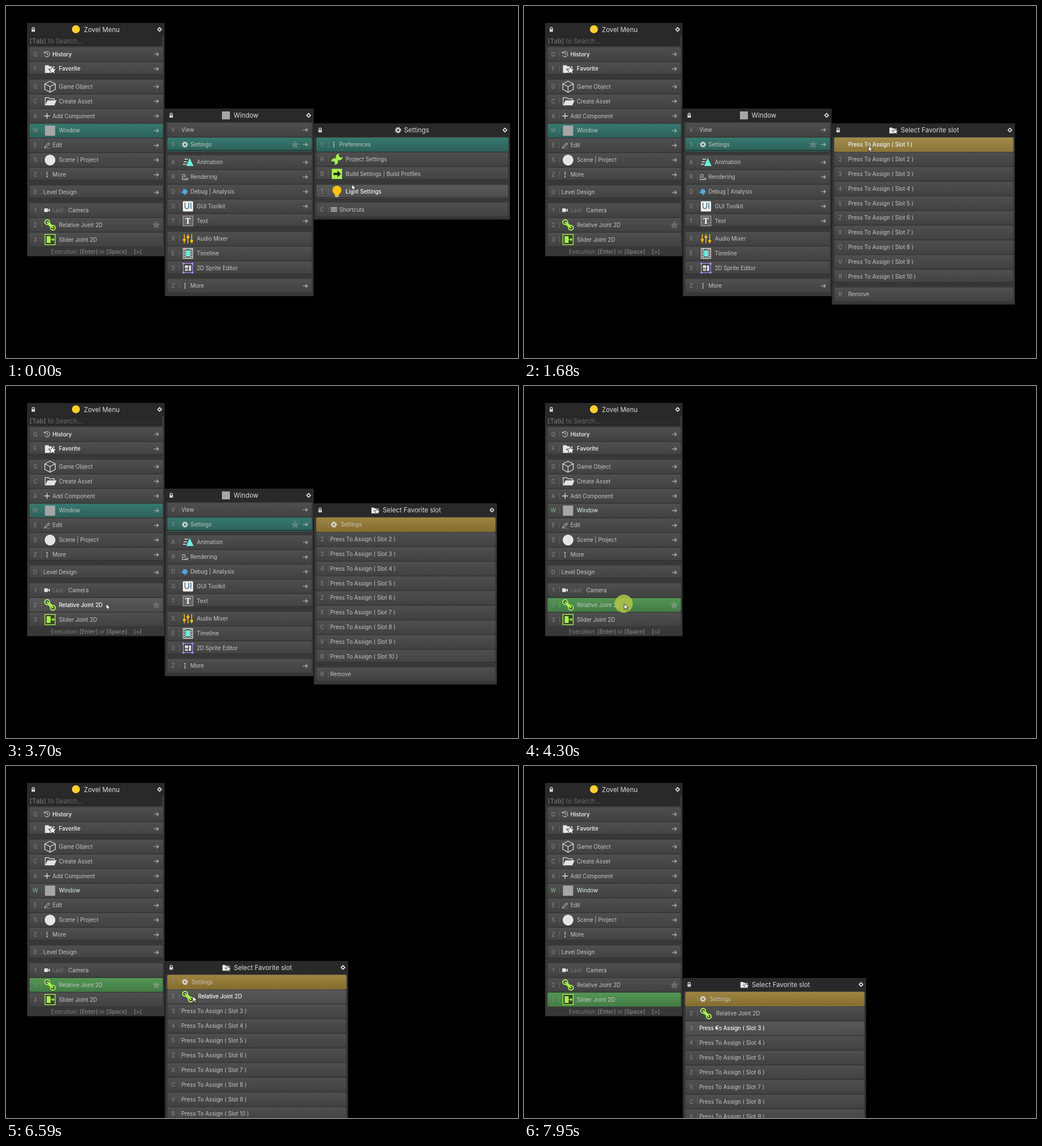
These frames come from a looping animation (901 by 621 pixels, 8000 ms). An HTML page:

```html
<!DOCTYPE html>
<html lang="en">
<head>
<meta charset="utf-8">
<title>Menu with favorite slots</title>
<style>
html, body { margin: 0; width: 100%; height: 100%; overflow: hidden; background: #000; }
svg { display: block; width: 100vw; height: 100vh; font: 9.72px Inter, sans-serif; }
text { fill: #c6c6c6; white-space: pre; }
.title { font-size: 11.4px; fill: #dcdcdc; }
.key { fill: #818181; text-anchor: middle; font-weight: 500; }
.strong { font-weight: 600; fill: #e6e6e6; }
.dim { fill: #7b7b7b; }
.lit text:not(.dim) { fill: #f0f0f0; }
.line { fill: none; stroke: #dedede; stroke-width: 1.3; stroke-linejoin: round; stroke-linecap: round; }
.thin { stroke-width: 1; }
.thick { stroke-width: 1.7; }
.solid { fill: #e4e4e4; }
.lime { fill: #a8f04e; }
.limeline { fill: none; stroke: #a8f04e; }
.timed { animation: 8s step-end infinite; }
#cursor { animation: move 8s linear infinite; }
@keyframes move {
  0%, .75% { transform: translate(608.5px, 314.5px); animation-timing-function: ease-in-out; }
  7%, 11.625% { transform: translate(440px, 247px); animation-timing-function: ease-in; }
  15% { transform: translate(500px, 257px); animation-timing-function: ease-out; }
  19.8%, 23.5% { transform: translate(606.3px, 246.5px); animation-timing-function: ease-in; }
  32.25% { transform: translate(393px, 300px); }
  37.5% { transform: translate(228.6px, 363.7px); animation-timing-function: ease-out; }
  42.75% { transform: translate(191px, 373px); animation-timing-function: ease-out; }
  46.25%, 59.75% { transform: translate(176.3px, 384px); animation-timing-function: ease-in-out; }
  67.5%, 82.375% { transform: translate(328.8px, 406px); animation-timing-function: ease-in-out; }
  87%, 92.625% { transform: translate(207.3px, 406px); animation-timing-function: ease-in-out; }
  99.2%, 100% { transform: translate(336.4px, 456.7px); }
}
</style>
</head>
<body>
<svg id="stage" viewBox="0 0 901 621"></svg>
<script>
const PITCH = 25.88, GAP = 5.5;
const STAR = 'M0-7.5L2.2-2.6 7.3-2.2 3.5 1.4 4.6 6.6 0 3.8-4.6 6.6-3.5 1.4-7.3-2.2-2.2-2.6z';
const timing = new Map();

// Shows the markup only between two times of the 8000 ms loop.
function during(from, to, markup) {
  const name = `t${from}-${to}`;
  timing.set(name, `@keyframes ${name}{0%{opacity:0}${from / 80}%{opacity:1}` +
    (to < 8000 ? `${to / 80}%{opacity:0}}` : '100%{opacity:1}}'));
  return `<g class="timed" style="animation-name:${name}">${markup}</g>`;
}

const at = (x, y, markup, scale = 1) => `<g transform="translate(${x} ${y}) scale(${scale})">${markup}</g>`;
const path = (d, cls = 'line', more = '') => `<path class="${cls}" d="${d}" ${more}/>`;
const rect = (x, y, w, h, fill, more = '') =>
  `<rect x="${x}" y="${y}" width="${w}" height="${h}" fill="${fill}" ${more}/>`;
const dot = (x, y, r, fill, more = '') => `<circle cx="${x}" cy="${y}" r="${r}" fill="${fill}" ${more}/>`;
const label = (x, y, text, cls = '', more = '') => `<text x="${x}" y="${y + 3.5}" class="${cls}" ${more}>${text}</text>`;

const small = {
  history: path('M-4.2-2.4A4.8 4.8 0 1 1-4.4 2M-4.9-4.4v2.4h2.4M0-2.5V.3L2 1.6', 'line thin'),
  plus: path('M-4.5 0h9M0-4.5v9'),
  pencil: path('M-4.6 4.6l1-3L2.8-4.4l2 2L-1.6 3.7zM0 5.2h.1M2.5 5.2h.1M5 5.2h.1', 'line thin'),
  dots: [-3.6, 0, 3.6].map(y => dot(0, y, 1.1, '#dedede')).join(''),
  camera: rect(-5, -3.3, 6.6, 6.6, '#e4e4e4', 'rx="1"') + path('M2.2-.8L5-3V3L2.2.8z', 'solid'),
  gear: dot(0, 0, 3, 'none', 'stroke="#d4d4d4" stroke-width="2.4"') +
    dot(0, 0, 4.7, 'none', 'stroke="#d4d4d4" stroke-width="1.5" stroke-dasharray="2.1 1.591"'),
  render: dot(-2, -2, 2.7, 'none', 'stroke="#dedede"') +
    path('M-4.8 1.5V4.6H5V2.6M-1 4.4C1 4.4 1.5 1 5 2.4', 'line thin'),
  bug: `<g stroke="#55a9dc" stroke-width="1.4" transform="rotate(35)">${path('M-5-3l3 2M5-3l-3 2M-5.5 1h11M-4.5 5l3-3M4.5 5l-3-3', '')}
    <ellipse rx="2.6" ry="4" fill="#55a9dc"/></g>`,
  keyboard: rect(-5, -3.5, 10, 7, 'none', 'stroke="#c8c8c8"') + path('M-4-1.2h8M-4 1.2h8M-2-3v6M0-3v4M2-3v6', '', 'stroke="#c8c8c8" stroke-width=".8"')
};

const favorite = path('M-9 7V-6.5h6l2 2h8.5V7z', 'solid') +
  at(4.4, 2.6, path(STAR, '', 'fill="#f0f0f0" stroke="#3c3c3c" stroke-width="2.4" paint-order="stroke"'), .8);

const large = {
  favorite,
  cube: path('M0-9.8L9.2-5V5L0 9.8-9.2 5V-5zM-9.2-5L0 0 9.2-5M0 0V9.8'),
  folder: path('M-8.5 6.5V-6.5h6l2 2h8v3') + path('M-8.5 7L-4.5-1.6H11.5L7.5 7z', 'solid'),
  window: rect(-9, -9, 18, 18, '#a6a6a6'),
  scene: dot(0, 0, 9.5, '#e4e4e4'),
  joint: path('M-5-5L5 5', 'limeline', 'stroke-width="5"') +
    [-5, 5].map(p => dot(p, p, 4.2, '#444', 'stroke="#a8f04e" stroke-width="2"')).join('') +
    path('M-5-5L5 5', 'limeline', 'stroke-width="2.4" stroke-linecap="round"'),
  slider: rect(-9, -9, 18, 18, '#35402c', 'stroke="#a8f04e" stroke-width="1.4"') + rect(-6, -6, 7, 12, '#a8f04e') +
    path('M1 0H7M4.7-2.5L7 0 4.7 2.5', 'limeline', 'stroke-width="1.5"'),
  motion: path('M3-7.5L10 6.5H-3z', '', 'fill="#6df0df"') + path('M-5.5-5.5h5M-7-1h5M-8.5 3.5h5'),
  ui: rect(-9, -9, 18, 18, '#f2f2f2', 'rx="1.5"') +
    '<text y="5" text-anchor="middle" style="font-size:14px;fill:#245a7b">UI</text>',
  type: rect(-8.8, -8.8, 17.6, 17.6, '#666', 'stroke="#aaa"') +
    '<text y="5" text-anchor="middle" style="font:bold 14px Noto Serif,serif;fill:#fff">T</text>',
  mixer: [[-6.5, 2], [0, -3], [6.5, 4]].map(([x, y]) =>
    path(`M${x}-8V8`, '', 'stroke="#ffc20e" stroke-width="1.5"') + rect(x - 2.4, y - 1.8, 4.8, 3.6, '#ffc20e', 'rx="1"')).join(''),
  film: rect(-8.5, -9, 17, 18, '#333', 'stroke="#e2e2e2"') + rect(-3.6, -5.5, 7.2, 11, '#6df0df') +
    path('M-4.6-9V9M4.6-9V9M-4-7.5H4M-4 7.5H4', 'line thin') +
    path('M-6.6-8V9M6.6-8V9', '', 'stroke="#e2e2e2" stroke-width="2" stroke-dasharray="2.2 1.8"'),
  sprite: rect(-8, -8, 16, 16, '#333', 'stroke="#a78be8" stroke-width="1.4"') + rect(-5.5, -5, 6, 5, '#ddd') +
    rect(-5.5, 1.2, 6, 4, '#bbb') + rect(1.8, -5, 3.8, 10.2, '#ddd') +
    [[-8, -8], [8, -8], [-8, 8], [8, 8]].map(([x, y]) => dot(x, y, 2, '#a78be8')).join(''),
  wrench: path('M-4.5 4.5L4.5-4.5', 'limeline', 'stroke-width="4.6"') +
    path('M4-10A6 6 0 1 0 10-4L6-3 3-6z', 'lime') + path('M-4 10A6 6 0 1 0-10 4L-6 3-3 6z', 'lime'),
  build: rect(-9, -9, 18, 18, '#a8f04e') + path('M-6-2H1v-4L7 0 1 6V2H-6z', '', 'fill="#202820"'),
  bulb: dot(0, -2.6, 7.7, '#ffc20e') + path('M-4.5 2H4.5L3.5 6.5H-3.5z', '', 'fill="#ffc20e"') +
    rect(-3, 7, 6, 2.6, '#c8c8c8', 'rx="1"')
};

const arrow = path('M-4 0H4M.8-3.2L4 0 .8 3.2', '', 'fill="none" stroke="#b4b4b4" stroke-width="1.2"');
const star = (x, y, fill = '#6b6b6b') => at(x, y, path(STAR, '', `fill="${fill}"`));

function item(x, y, text, icon, cls = '', shift = 0) {
  const big = icon in large;
  const mark = icon ? at(x + (big ? 40.5 : 35.2), y, big ? large[icon] : small[icon]) : '';
  return mark + label(x + (icon ? (big ? 56 : 44.7) : 28.7) + shift, y, text, cls);
}

const rowBox = (x, y, w, fill, more = '') => rect(x + 4.5, y - 12.2, w - 7.5, 24.6, fill, 'rx="2" ' + more);
const tint = (x, y, w, name) => rowBox(x, y, w, `url(#${name})`);

// A row is [key, text, icon, {arrow, cls, under, body, hover}]; null is a group separator.
function panel({ x, y, w, h, title, rows, rowY = y + 37 }) {
  let out = rect(x, y, w, h, '#383838') + rect(x, y, w, 23.5, '#292929') +
    rect(x + .5, y + .5, w - 1, h - 1, 'none', 'stroke="#2d2d2d"') +
    at(x + 11, y + 12, path('M-2-1v-1.3a2 2 0 0 1 4 0V-1') + rect(-3, -1, 6, 4.6, '#d0d0d0', 'rx=".6"')) +
    at(x + w - 8.7, y + 11.3, path('M0-3.3L3.3 0 0 3.3-3.3 0z', 'line thick')) + title;
  let cy = rowY;
  for (const row of rows) {
    if (!row) {
      out += rect(x + 1, cy - 16.2, w - 2, 1.2, '#292929');
      cy += GAP;
      continue;
    }
    const [key, text, icon, o = {}] = row;
    const body = o.body ? o.body(x, cy, w) : item(x, cy, text, icon, o.cls);
    out += rect(x + 4.5, cy - 11.6, w - 7.5, 24.8, '#2c2c2c', 'rx="2"') + tint(x, cy, w, 'plain') +
      (o.under ? o.under(x, cy, w) : '') +
      (o.hover ? during(...o.hover, rowBox(x, cy, w, 'rgba(255,255,255,.06)')) : '') +
      label(x + 14.6, cy, key, 'key') + rect(x + 25, cy - 5.5, 1, 11, '#fff', 'opacity=".14"') + body +
      (o.hover ? during(...o.hover, `<g class="lit">${body}</g>`) : '') +
      (o.arrow ? at(x + w - 14.6, cy, arrow) : '');
    cy += PITCH;
  }
  return out;
}

const heading = (x, y, text) => `<text class="title" x="${x}" y="${y + 4.1}">${text}</text>`;
const go = { arrow: true };

const mainMenu = () => panel({
  x: 37, y: 30, w: 242, h: 411.3, rowY: 85,
  title: dot(123, 41, 7, '#ffd02e') + heading(137, 41.5, 'Zovel Menu') +
    rect(39.5, 54, 234, 15.5, '#2a2a2a', 'stroke="#1e1e1e" rx="2"') +
    '<text class="title" x="41.5" y="66" style="fill:#696969"><tspan font-weight="600">[Tab]</tspan> to Search...</text>',
  rows: [
    ['Q', 'History', 'history', { arrow: true, cls: 'strong' }],
    ['F', 'Favorite', 'favorite', { arrow: true, cls: 'strong' }],
    null,
    ['G', 'Game Object', 'cube', go],
    ['C', 'Create Asset', 'folder', go],
    ['A', 'Add Component', 'plus', go],
    ['W', 'Window', 'window', { arrow: true,
      under: (x, y, w) => during(0, 4300, tint(x, y, w, 'teal')),
      body: (x, y) => item(x, y, 'Window', 'window') +
        during(4300, 8000, label(x + 14.6, y, 'W', 'key', 'style="fill:#6f9a78"') +
          label(x + 56, y, 'Window', '', 'style="fill:#b9cfbd"')) }],
    ['E', 'Edit', 'pencil', go],
    ['S', 'Scene | Project', 'scene', go],
    ['Z', 'More', 'dots', go],
    null,
    ['D', 'Level Design', '', go],
    null,
    ['1', '', '', { hover: [2880, 3420],
      body: (x, y) => item(x, y, 'Last:', 'camera', 'dim') + label(x + 72.6, y, 'Camera') }],
    ['2', '', '', { hover: [3490, 4300],
      under: (x, y, w) => during(4300, 7010, tint(x, y, w, 'green')),
      body: (x, y) => item(x, y, 'Relative Joint 2D', 'joint') + star(264.5, y) +
        during(4300, 7010, star(264.5, y, '#719b72')) }],
    ['3', 'Slider Joint 2D', 'slider', {
      under: (x, y, w) => during(7010, 8000, tint(x, y, w, 'green')) }]
  ]
}) + '<text x="79" y="437.3" class="dim">Execution: <tspan font-weight="600">[Enter]</tspan> or <tspan font-weight="600">[Space]</tspan></text>' +
  label(225, 433.8, '[&gt;]', 'dim', 'font-weight="600"');

const windowMenu = () => panel({
  x: 279.7, y: 181.5, w: 261.5, h: 330.5,
  title: rect(380, 186, 14, 14, '#a6a6a6') + heading(400.5, 193, 'Window'),
  rows: [
    ['V', 'View', '', go],
    ['S', 'Settings', 'gear', { arrow: true, hover: [300, 1200],
      under: (x, y, w) => tint(x, y, w, 'teal') + star(508.7, y, '#5d827d') }],
    null,
    ['A', 'Animation', 'motion', go],
    ['R', 'Rendering', 'render', go],
    ['D', 'Debug | Analysis', 'bug', go],
    ['G', 'GUI Toolkit', 'ui', go],
    ['T', 'Text', 'type', go],
    null,
    ['X', 'Audio Mixer', 'mixer'],
    ['E', 'Timeline', 'film'],
    ['2', '2D Sprite Editor', 'sprite'],
    null,
    ['Z', 'More', 'dots', go]
  ]
});

const settingsMenu = () => panel({
  x: 541.8, y: 207.5, w: 345, h: 169,
  title: at(690, 219, small.gear) + heading(700.5, 219, 'Settings'),
  rows: [
    ['E', 'Preferences', 'dots', { under: (x, y, w) => tint(x, y, w, 'teal') }],
    ['R', 'Project Settings', 'wrench'],
    ['B', 'Build Settings | Build Profiles', 'build'],
    null,
    ['T', 'Light Settings', 'bulb', { hover: [0, 200] }],
    null,
    ['C', 'Shortcuts', 'keyboard']
  ]
});

// assigned[i] is the time at which slot i+1 gets filled; hovered is [slot, from, to].
function slotMenu(x, y, assigned, [hoveredSlot, ...hover]) {
  const filled = [['Settings', 'gear'], ['Relative Joint 2D', 'joint']];
  const slots = [...'12345ZXCVB'].map((key, i) => [key, '', '', {
    hover: hoveredSlot === i + 1 && hover,
    under: (px, py, w) => i ? '' : rowBox(px, py, w, 'url(#gold)', 'stroke="#a8914b" stroke-width=".6"'),
    body: (px, py) => {
      const empty = item(px, py, `Press To Assign ( Slot ${i + 1} )`);
      if (!(i in assigned)) return empty;
      const time = assigned[i], done = item(px, py, ...filled[i], '', 2.4);
      return time ? during(0, time, empty) + during(time, 8000, done) : done;
    }
  }]);
  // Nested timed groups multiply their opacity, so a swapped label stays hidden outside the hover.
  return panel({
    x, y, w: 322, h: 319,
    title: at(x + 108, y + 12, favorite, .76) + heading(x + 121.2, y + 11.7, 'Select Favorite slot'),
    rows: [...slots, null, ['R', 'Remove']]
  });
}

const gradient = (id, top, bottom) =>
  `<linearGradient id="${id}" x2="0" y2="1"><stop stop-color="${top}"/><stop offset="1" stop-color="${bottom}"/></linearGradient>`;
const click = (from, to, x, y) => during(from, to, dot(x, y, 16, '#b5c748', 'fill-opacity=".82"'));

const scene = '<defs>' + gradient('plain', '#4f4f4f', '#414141') + gradient('teal', '#367a70', '#2c6058') +
  gradient('gold', '#9d8440', '#846c2d') + gradient('green', '#539553', '#437c45') + '</defs>' +
  mainMenu() +
  during(0, 4300, windowMenu()) +
  during(0, 600, settingsMenu()) +
  during(800, 4300, slotMenu(541.8, 207.5, [1880], [1, 1250, 2080])) +
  during(4500, 7010, slotMenu(279.7, 344, [0, 5730], [2, 5130, 6650])) +
  during(7210, 8000, slotMenu(279.7, 374, [0, 0], [3, 7750, 8000])) +
  click(600, 800, 440, 246.5) + click(1810, 1880, 606, 246.5) + click(4300, 4500, 175.5, 384) +
  click(5660, 5730, 328.5, 406.5) + click(7010, 7210, 207, 406) +
  '<g id="cursor"><path d="M0 0V10L2.3 8 4 11.4 5.7 10.6 4.1 7.4H7.2z" fill="#fff" stroke="#111" stroke-width=".8"/></g>';

document.getElementById('stage').innerHTML = `<style>${[...timing.values()].join('')}</style>` + scene;
</script>
</body>
</html>
```
